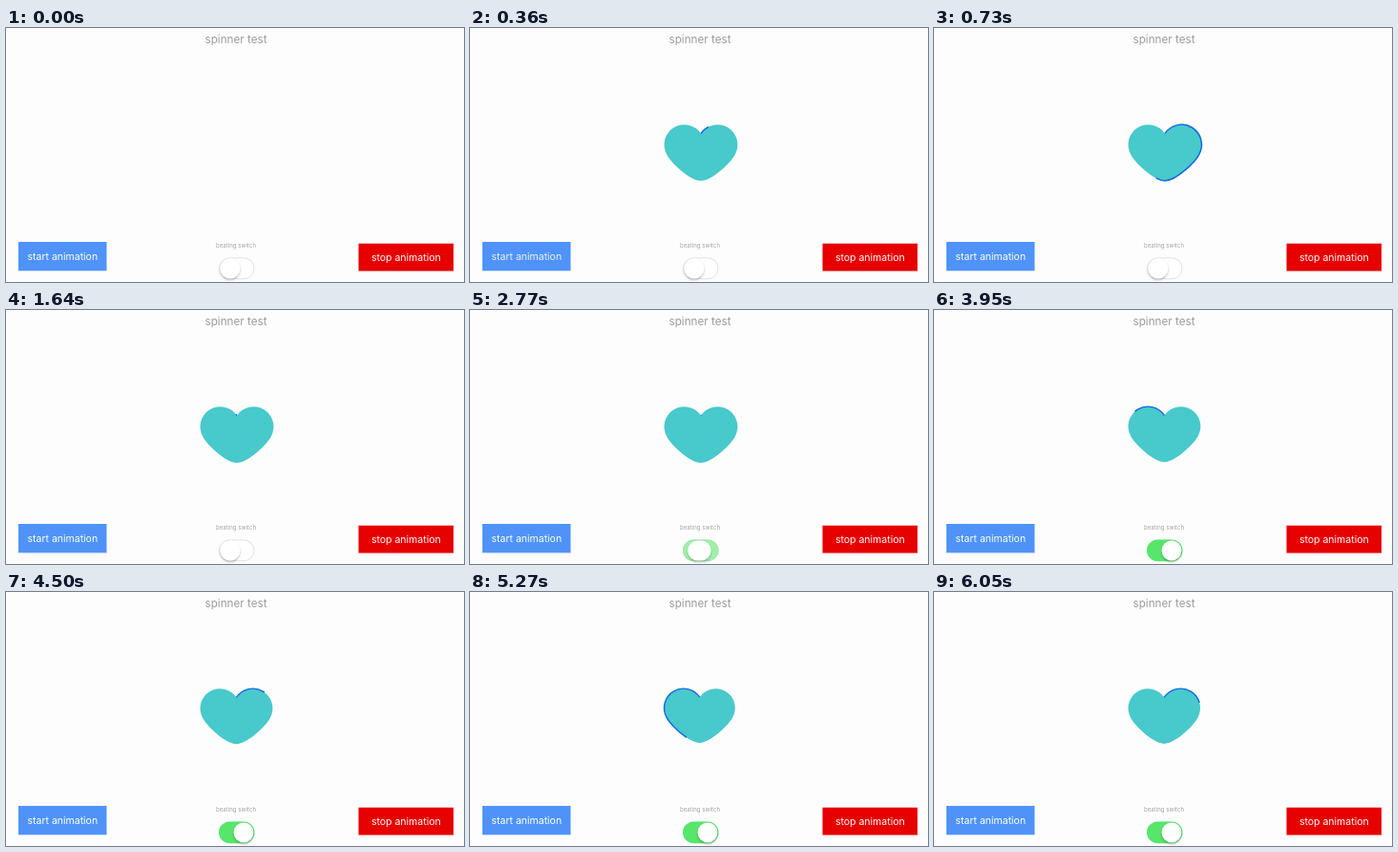
Recreate the animation shown at these times as an HTML page. Size 480 by 266 pixels, loop 6.1 s.

```html
<!DOCTYPE html>
<html lang="en">
<head>
<meta charset="utf-8">
<title>Spinner test</title>
<style>
  html, body { margin: 0; width: 100%; height: 100%; overflow: hidden; background: #fefdfe; }
  svg { display: block; width: 100vw; height: 100vh; }
  text { font-family: Inter, Roboto, sans-serif; text-anchor: middle; }
  .title { font-size: 11.7px; fill: #9b9b9f; }
  .label { font-size: 6.1px; fill: #a3a3a7; }
  .button { font-size: 10.5px; fill: #fff; }
</style>
</head>
<body>
<svg viewBox="0 0 480 266">
  <defs>
    <filter id="shadow" x="-40%" y="-40%" width="180%" height="190%">
      <feDropShadow dx="0" dy="1.5" stdDeviation="1.1" flood-color="#000" flood-opacity=".3"/>
    </filter>
  </defs>
  <rect width="480" height="266" fill="#fefdfe"/>
  <text class="title" x="241" y="16">spinner test</text>

  <g id="heart">
    <path id="fill" fill="#48c9cb"/>
    <path id="line" fill="none" stroke="#1469e2" stroke-width="1.5" pathLength="1"/>
  </g>

  <rect x="13" y="224" width="92.5" height="30.3" fill="#4f93f8"/>
  <text id="start" class="button" x="59.3" y="243">start animation</text>
  <rect x="369.5" y="225.7" width="99.5" height="28.8" fill="#e60000"/>
  <text class="button" x="419.3" y="244">stop animation</text>

  <text class="label" x="241" y="229.6">beating switch</text>
  <rect x="223.5" y="240.9" width="36.5" height="21.8" rx="10.9" fill="#fff" stroke="#e2e2e4"/>
  <rect id="track" x="223" y="240.4" width="37.5" height="22.8" rx="11.4" fill="#57e56b"/>
  <rect id="knob" y="241.4" height="20.8" rx="10.4" fill="#fff" filter="url(#shadow)"/>
</svg>
<script>
const LOOP = 6100, SPIN = 1500;
const SHOWN = 205, BEAT = 2730;
const HEART = "M242 110.5A21 21 0 0 1 277.8 132.4C274.4 139.7 254 160 242 160" +
              "C230 160 209.6 139.7 206.2 132.4A21 21 0 0 1 242 110.5Z";
const el = id => document.getElementById(id);
const clamp = x => Math.min(1, Math.max(0, x));
const ramp = (t, from, to) => clamp((t - from) / (to - from));

// cubic-bezier(.42, 0, .58, 1)
function ease(x) {
  let lo = 0, hi = 1;
  for (let i = 0; i < 20; i++) {
    const u = (lo + hi) / 2, v = 1 - u;
    if (3 * v * v * u * .42 + 3 * v * u * u * .58 + u ** 3 < x) lo = u; else hi = u;
  }
  return lo * lo * (3 - 2 * lo);
}

const heart = el("heart"), line = el("line"), knob = el("knob");
el("fill").setAttribute("d", HEART);
line.setAttribute("d", HEART);

function drawHeart(t) {
  heart.style.display = t < SHOWN ? "none" : "";
  if (t < SHOWN) return;
  const beating = t >= BEAT;
  const phase = (t - (beating ? BEAT : SHOWN)) % SPIN;
  const head = ease(ramp(phase, 0, 1000));
  const tail = ease(ramp(phase, 500, 1500));
  line.setAttribute("stroke-dasharray", `${head - tail} 2`);
  line.setAttribute("stroke-dashoffset", -tail);
  const half = SPIN / 2;
  const squeeze = beating ? ease(1 - Math.abs(phase - half) / half) : 0;
  heart.setAttribute("transform",
    `translate(203.5 101) scale(${1 - .05 * squeeze}) translate(-203.5 -101)`);
}

function drawSwitch(t) {
  const slide = ease(ramp(t, 2695, 2880));
  const stretch = ramp(t, 2600, 2690) - ramp(t, 2790, 2930);
  const width = 20.8 + 3.6 * stretch;
  const left = 224.5 + slide * (259.4 - width - 224.5);
  knob.setAttribute("x", left);
  knob.setAttribute("width", width);
  el("track").setAttribute("opacity", ramp(t, 2695, 2830));
}

function draw(now) {
  const t = now % LOOP;
  drawHeart(t);
  drawSwitch(t);
  const press = ramp(t, 50, 90) - ramp(t, 200, 400);
  el("start").setAttribute("opacity", 1 - .6 * press);
}

const begin = performance.now();
function tick() {
  draw(performance.now() - begin);
  requestAnimationFrame(tick);
}
tick();
</script>
</body>
</html>
```
